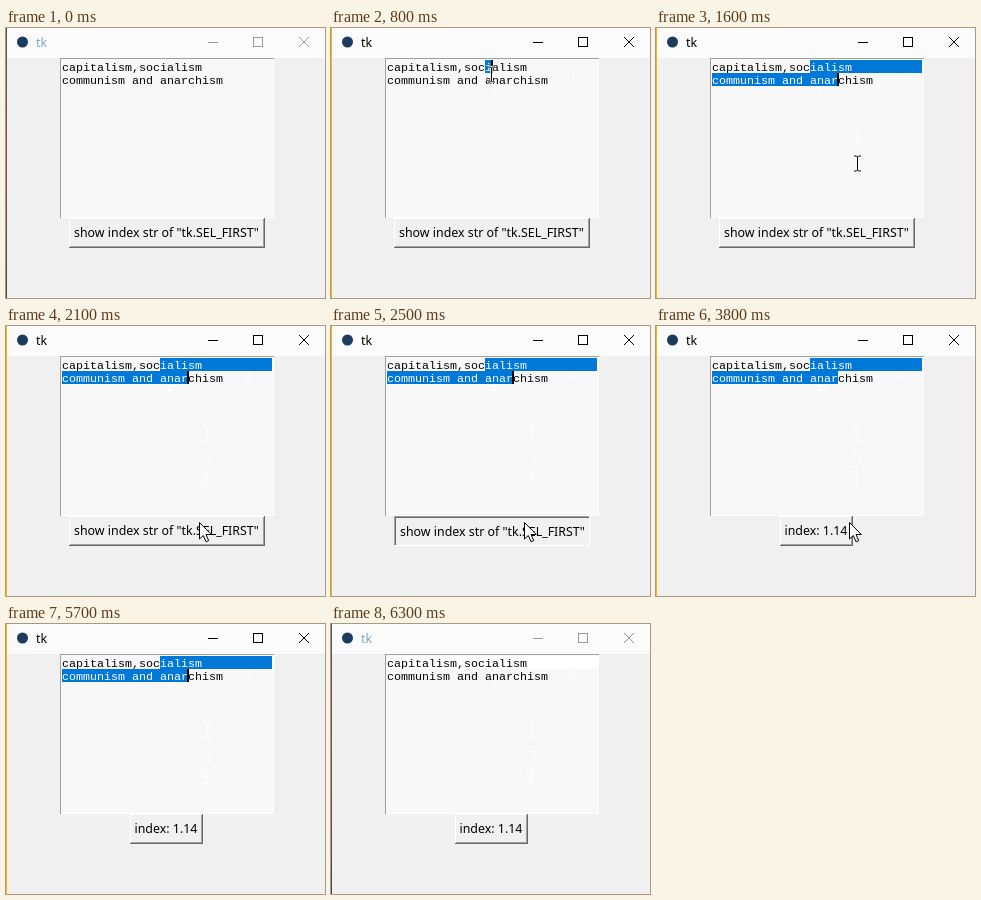
Animation of 319 by 270 pixels, one loop 6400 ms. Source, as an HTML page:

```html
<!DOCTYPE html>
<html lang="en">
<head>
<meta charset="utf-8">
<title>tk</title>
<style>
  html, body { margin: 0; width: 100%; height: 100%; overflow: hidden; background: #f0f0f0; }
  svg { display: block; width: 100vw; height: 100vh; }
  text { white-space: pre; }
  .ui { font: 12.4px "Noto Sans", "Open Sans", sans-serif; }
  .mono { font: 11.67px "Liberation Mono", "DejaVu Sans Mono", monospace; }
  .crisp { shape-rendering: crispEdges; }
</style>
</head>
<body>
<svg viewBox="0 0 319 270" xmlns="http://www.w3.org/2000/svg">
  <defs>
    <linearGradient id="dim" x2="0" y2="1">
      <stop offset="0" stop-color="#555"/>
      <stop offset=".45" stop-color="#85584e"/>
      <stop offset="1" stop-color="#4c4644"/>
    </linearGradient>
    <clipPath id="picked"><rect id="clip1"/><rect id="clip2"/></clipPath>
    <g id="words" class="mono">
      <text x="56" y="43">capitalism,socialism</text>
      <text x="56" y="56">communism and anarchism</text>
    </g>
    <path id="beam" d="M-3.5 -7.5H-1L0 -6.5L1 -7.5H3.5M0 -6.5V6.5M-3.5 7.5H-1L0 6.5L1 7.5H3.5" fill="none"/>
  </defs>

  <rect width="319" height="270" fill="#f0f0f0"/>
  <rect width="319" height="30" fill="#fbfbfb"/>
  <rect id="edge" class="crisp" width="1" height="270"/>
  <circle cx="16.5" cy="14" r="5.5" fill="#1d3b5c"/>
  <text id="title" class="ui" x="30" y="18.6">tk</text>
  <g id="controls" fill="none">
    <path class="crisp" d="M202 14.5H212M247.5 9.5H256.5V18.5H247.5Z"/>
    <path d="M293 9L303 19M303 9L293 19"/>
  </g>

  <g class="crisp">
    <rect x="54" y="30" width="214" height="160" fill="#fff"/>
    <path d="M54 30H268V31H55V190H54Z" fill="#a0a0a0"/>
    <rect x="55" y="31" width="212" height="158" fill="#f8f8f8"/>
    <rect id="strip" x="55" y="32" width="212" height="13" fill="#fff"/>
  </g>
  <g id="ghosts" stroke="#fff" fill="none">
    <use href="#beam" x="242.5" y="46.5"/>
    <path d="M161 64.5H166M163.5 53V64M166 57L170 61"/>
    <use href="#beam" x="201.5" y="107.5"/>
    <path d="M198 127.5H206M203.5 128V138L200 141"/>
    <path d="M194 145.5H201M200.5 145V159H194M195 149L200 155"/>
  </g>

  <use href="#words"/>
  <g id="selection">
    <g class="crisp" fill="#0078d7"><rect id="sel1"/><rect id="sel2"/></g>
    <use href="#words" fill="#fff" clip-path="url(#picked)"/>
  </g>
  <rect id="caret" class="crisp" width="2" height="13"/>

  <g class="crisp">
    <path id="outerA"/><path id="outerB"/><path id="innerB"/>
  </g>
  <text id="label" class="ui"></text>

  <g id="ibeam">
    <use href="#beam" stroke="#fff" stroke-width="2.4"/>
    <use href="#beam" stroke="#000"/>
  </g>
  <path id="arrow" d="M0 0V16.5L3.8 13L6.6 19.3L9.2 18.1L6.5 12H11.8Z" fill="#fff" stroke="#000"/>
</svg>
<script>
const LOOP = 6400, STEP = 100, CHAR = 7, LEFT = 56;
const $ = id => document.getElementById(id);
const set = (el, attrs) => {
  for (const k in attrs) el.setAttribute(k, attrs[k]);
};
const show = (el, on) => set(el, { visibility: on ? "visible" : "hidden" });
const last = (keys, t) => keys.filter(k => k[0] <= t).pop();

// time, x, y, pointer kind
const pointer = [
  [0, 0, 0, ""],
  [100, 242.5, 46.5, "beam"], [200, 220.5, 50.5, "beam"], [300, 190.5, 56.5, "beam"],
  [400, 165.5, 58.5, "beam"], [500, 159.5, 48.5, "beam"], [600, 156.5, 40.5, "beam"],
  [800, 160.5, 46.5, "beam"], [900, 164.5, 49.5, "beam"], [1000, 170.5, 51.5, "beam"],
  [1100, 176.5, 52.5, "beam"], [1200, 181.5, 52.5, "beam"], [1300, 184.5, 52.5, "beam"],
  [1500, 201.5, 107.5, "beam"], [1600, 201.5, 135.5, "beam"], [1700, 199.5, 146.5, "beam"],
  [1800, 197.5, 153.5, "beam"],
  [1900, 193.5, 187.5, "arrow"], [2000, 193.5, 193.5, "arrow"], [2100, 193.5, 196.5, "arrow"],
  [5100, 222.5, 194.5, "arrow"], [5200, 262.5, 190.5, "arrow"], [5300, 304.5, 184.5, "arrow"],
  [5400, 0, 0, ""]
];
// time, line, column of the selection end
const drag = [[800, 1, 15], [900, 2, 15], [1000, 2, 16], [1100, 2, 17], [1300, 2, 18]];
const ghostTimes = [200, 500, 1600, 1700, 1900];

function caretOn(t) {
  if (t < 800 || t >= 6300) return false;
  if (t < 2200) return t < 1300 || t >= 1600;
  return (t - 2200) % 800 >= 300;
}

function drawSelection(t) {
  const active = t >= 800 && t < 6300;
  show($("selection"), active);
  show($("caret"), caretOn(t));
  if (!active) return;
  const [, line, col] = last(drag, t);
  const end = LEFT + col * CHAR, start = LEFT + 14 * CHAR;
  const first = { x: start, y: 32, width: (line > 1 ? 266 : end) - start, height: 13 };
  const second = { x: LEFT, y: 45, width: line > 1 ? end - LEFT : 0, height: 13 };
  for (const id of ["sel1", "clip1"]) set($(id), first);
  for (const id of ["sel2", "clip2"]) set($(id), second);
  set($("caret"), { x: end - 1, y: line > 1 ? 45 : 32 });
}

function drawButton(t) {
  const done = t >= 2600, down = t >= 2400 && !done;
  const l = done ? 124 : 63, r = done ? 197 : 259, top = 190, b = 220;
  const corner = (i, low) => low
    ? `M${r - i} ${top + i}V${b - i}H${l + i}V${b - i - 1}H${r - i - 1}V${top + i}Z`
    : `M${l + i} ${b - i}V${top + i}H${r - i}V${top + i + 1}H${l + i + 1}V${b - i}Z`;
  set($("outerA"), { d: corner(0, false), fill: down ? "#a0a0a0" : "#fff" });
  set($("outerB"), { d: corner(0, true), fill: down ? "#fff" : "#696969" });
  set($("innerB"), { d: corner(1, !down), fill: down ? "#696969" : "#a0a0a0" });
  const shift = down ? 1 : 0;
  set($("label"), { x: (done ? 128.5 : 68) + shift, y: 209 + shift });
  $("label").textContent = done ? "index: 1.14" : 'show index str of "tk.SEL_FIRST"';
}

function draw(time) {
  const t = Math.floor(time % LOOP / STEP) * STEP;
  const focus = t >= 800 && t < 6300;
  set($("edge"), { fill: focus ? "#f9b800" : "url(#dim)" });
  set($("title"), { fill: focus ? "#000" : "#7fa6bd" });
  set($("controls"), { stroke: focus ? "#000" : "#999" });
  show($("strip"), t >= 6300);
  [...$("ghosts").children].forEach((g, i) => show(g, t >= ghostTimes[i]));
  drawSelection(t);
  drawButton(t);
  const [, x, y, kind] = last(pointer, t);
  for (const [id, name] of [["ibeam", "beam"], ["arrow", "arrow"]]) {
    show($(id), kind === name);
    set($(id), { transform: `translate(${x} ${y})` });
  }
}

const begin = performance.now();
function tick() {
  draw(performance.now() - begin);
  requestAnimationFrame(tick);
}
tick();
</script>
</body>
</html>
```
